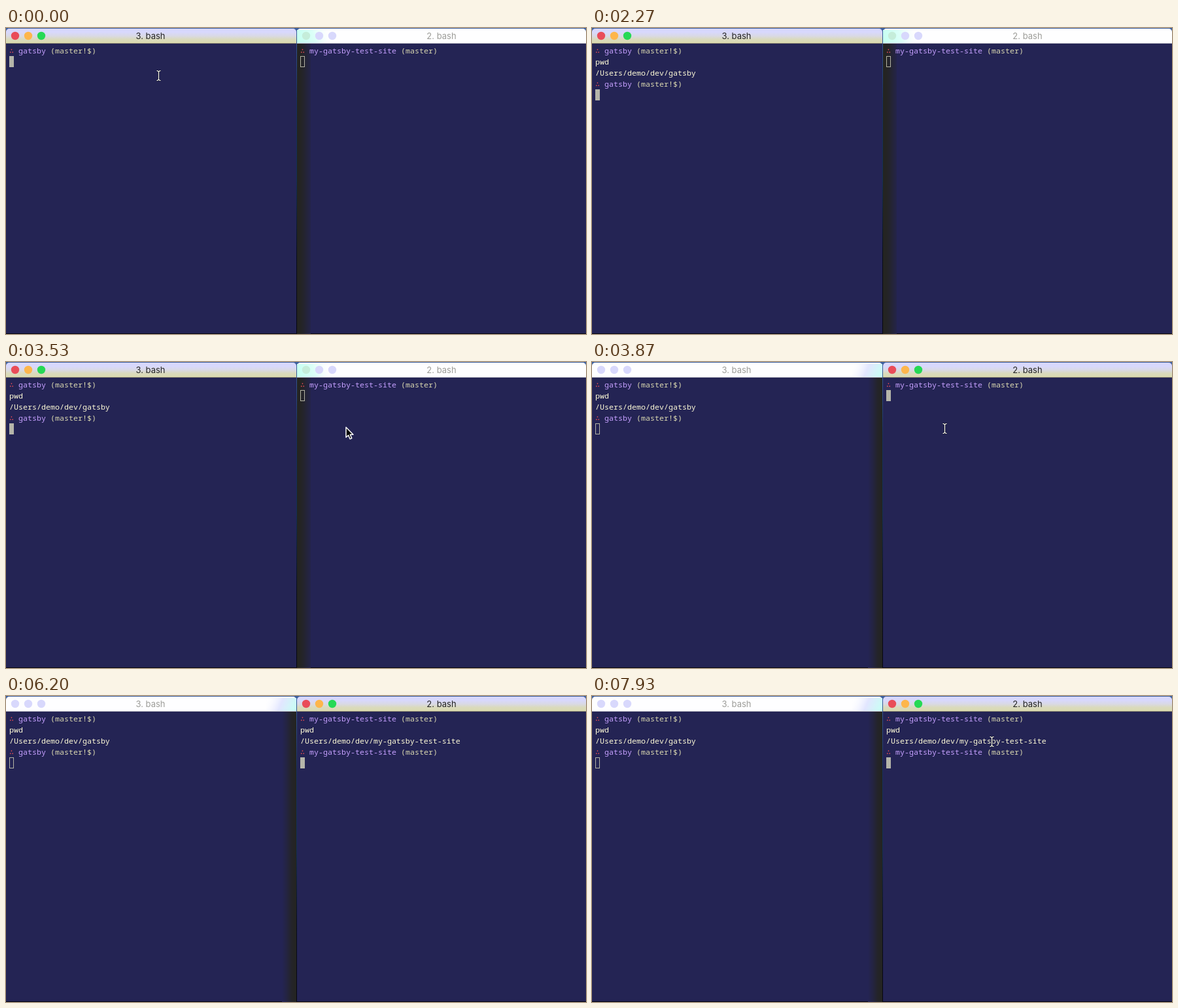
Recreate the animation shown at these times as an HTML page with a canvas. Size 887x469 px, loop 8000 ms.

```html
<!DOCTYPE html>
<html lang="en">
<head>
<meta charset="utf-8">
<title>Two terminals</title>
<style>
  html, body { margin: 0; width: 100%; height: 100%; overflow: hidden; background: #101830; }
  canvas { display: block; }
</style>
</head>
<body>
<canvas id="stage" width="887" height="469"></canvas>
<script>
const ctx = document.getElementById('stage').getContext('2d');
const LOOP = 8000, FOCUS_SWITCH = 3730;
const CHAR = 7, ROW = 17;
const MONO = '500 11.667px "Noto Sans Mono", monospace';
const SYMBOL = '11.63px "DejaVu Sans Mono", monospace';
const COLORS = {
  body: '#242454', dir: '#c6a0ff', branch: '#dad8b0', output: '#fffcd8',
  mark: '#e04a54', block: '#b5b5aa', outline: '#b4b4a4', idle: '#d8d8fc'
};
const LIGHTS = ['#e94c59', '#fdb64c', '#26d955'];

// Keystroke times of "pwd", then the time its output appears.
const terminals = [
  { x: 0, width: 444, title: '3. bash', titleX: 221, dir: 'gatsby', branch: '(master!$)',
    keys: [670, 740, 870], done: 1600 },
  { x: 445, width: 442, title: '2. bash', titleX: 666, dir: 'my-gatsby-test-site', branch: '(master)',
    keys: [5000, 5130, 5200], done: 5930 }
];

// Pointer paths as [time, x, y]; the pointer hides while typing.
const pointerPaths = [
  [[0, 233, 73], [670, 233, 73]],
  [[2870, 233, 73], [3270, 505, 103], [3530, 520, 100], [3730, 536, 102], [3870, 539, 102], [5000, 539, 102]],
  [[6670, 539, 102], [6800, 585, 107], [7000, 639, 102], [7250, 658, 90], [7500, 645, 74], [7930, 611, 70], [8000, 611, 70]]
];

function gradient(x0, y0, x1, y1, colors) {
  const g = ctx.createLinearGradient(x0, y0, x1, y1);
  colors.forEach((c, i) => g.addColorStop(i / (colors.length - 1), c));
  return g;
}

function rect(x, y, w, h, fill) {
  ctx.fillStyle = fill;
  ctx.fillRect(x, y, w, h);
}

function text(str, x, y, color, font = MONO, align = 'left') {
  ctx.font = font;
  ctx.textAlign = align;
  ctx.fillStyle = color;
  ctx.fillText(str, x, y);
}

function drawDesktop() {
  rect(0, 0, 887, 469, gradient(0, 0, 0, 469, ['#3c5f9e', '#16305c', '#123052', '#080c1c', '#060610']));
}

function drawTitleBar(term, active) {
  const { x, width } = term, left = x === 0;
  ctx.beginPath();
  ctx.roundRect(x, 1, width, 23, [5, 5, 0, 0]);
  ctx.fillStyle = active
    ? gradient(0, 1, 0, 23, ['#d8d8fe', '#d8d8fc', '#d9d9e6', '#dadabc', '#dbdbb0'])
    : '#fefeff';
  ctx.fill();
  if (!active) {
    const tint = left
      ? gradient(398, 1, 444, 20, ['#ffffff00', '#e2e6ff', '#c8fff4'])
      : gradient(445, 20, 497, 4, ['#c4fff0', '#dcfff8', '#ffffff00']);
    rect(left ? 398 : 445, 3, left ? 46 : 54, 20, tint);
  }
  rect(x, 23, width, 1, active ? '#8f8a76' : '#b4b4c0');
  LIGHTS.forEach((color, i) => {
    const shaded = !left && i === 0 ? '#c5edda' : COLORS.idle;
    ctx.fillStyle = active ? color : shaded;
    ctx.beginPath();
    ctx.arc(x + 14 + i * 20, 12, 6.2, 0, Math.PI * 2);
    ctx.fill();
  });
  text(term.title, term.titleX, 17, active ? '#242424' : '#9c9c98', '13px Inter, sans-serif', 'center');
}

function drawShadow(left) {
  if (left) rect(422, 24, 22, 445, gradient(422, 0, 444, 0, ['#242454', '#242442', '#24242a', '#242420']));
  else rect(445, 24, 21, 445, gradient(445, 0, 466, 0, ['#242420', '#242424', '#24242e', '#24243c', '#24244a']));
}

function drawPrompt(term, row) {
  const x = term.x + 5, y = 39 + row * ROW;
  text('∴', x, y, COLORS.mark, SYMBOL);
  text(term.dir, x + 2 * CHAR, y, COLORS.dir);
  text(term.branch, x + (3 + term.dir.length) * CHAR, y, COLORS.branch);
}

function drawTerminal(term, active, t) {
  const x = term.x + 5;
  const done = t >= term.done;
  const typed = term.keys.filter(k => t >= k).length;
  rect(term.x, 24, term.width, 444, COLORS.body);
  if (!active) drawShadow(term.x === 0);
  drawTitleBar(term, active);
  drawPrompt(term, 0);
  text('pwd'.slice(0, typed), x, 56, COLORS.output);
  if (done) {
    text('/Users/demo/dev/' + term.dir, x, 73, COLORS.output);
    drawPrompt(term, 3);
  }
  const cx = x + (done ? 0 : typed * CHAR), cy = done ? 94 : 43;
  if (active) {
    rect(cx, cy, CHAR, ROW, COLORS.block);
  } else {
    ctx.strokeStyle = COLORS.outline;
    ctx.lineWidth = 1;
    ctx.strokeRect(cx + .5, cy + .5, CHAR - 1, ROW - 1);
  }
}

function pointerAt(t) {
  const path = pointerPaths.find(p => t >= p[0][0] && t < p.at(-1)[0]);
  if (!path) return null;
  const i = path.findIndex(p => p[0] > t);
  const [t0, x0, y0] = path[i - 1], [t1, x1, y1] = path[i];
  const k = (t - t0) / (t1 - t0);
  return [x0 + (x1 - x0) * k, y0 + (y1 - y0) * k];
}

const beam = new Path2D('M-2.5-7.5H-1.5L.5-6L2.5-7.5H3.5M.5-6V6M-2.5 7.5H-1.5L.5 6L2.5 7.5H3.5');
const arrow = new Path2D('M0 0V15.5L3.6 12.2L6.1 18L8.8 16.8L6.3 11.2H11Z');

function strokePath(path, color, width) {
  ctx.strokeStyle = color;
  ctx.lineWidth = width;
  ctx.stroke(path);
}

function drawPointer(t) {
  const pos = pointerAt(t);
  if (!pos) return;
  const [x, y] = pos.map(Math.round);
  ctx.save();
  ctx.translate(x, y);
  ctx.lineJoin = 'round';
  if (t < FOCUS_SWITCH && x > 444) {
    ctx.fillStyle = '#000';
    ctx.fill(arrow);
    strokePath(arrow, '#fff', 1.5);
  } else {
    strokePath(beam, '#14142c', 2.6);
    strokePath(beam, '#fffff0', 1.2);
  }
  ctx.restore();
}

function draw(now) {
  const t = now % LOOP;
  const focused = t < FOCUS_SWITCH ? 0 : 1;
  drawDesktop();
  terminals.forEach((term, i) => drawTerminal(term, i === focused, t));
  drawPointer(t);
}

let start;
function tick(now) {
  start ??= now;
  draw(now - start);
  requestAnimationFrame(tick);
}
requestAnimationFrame(tick);
</script>
</body>
</html>
```
